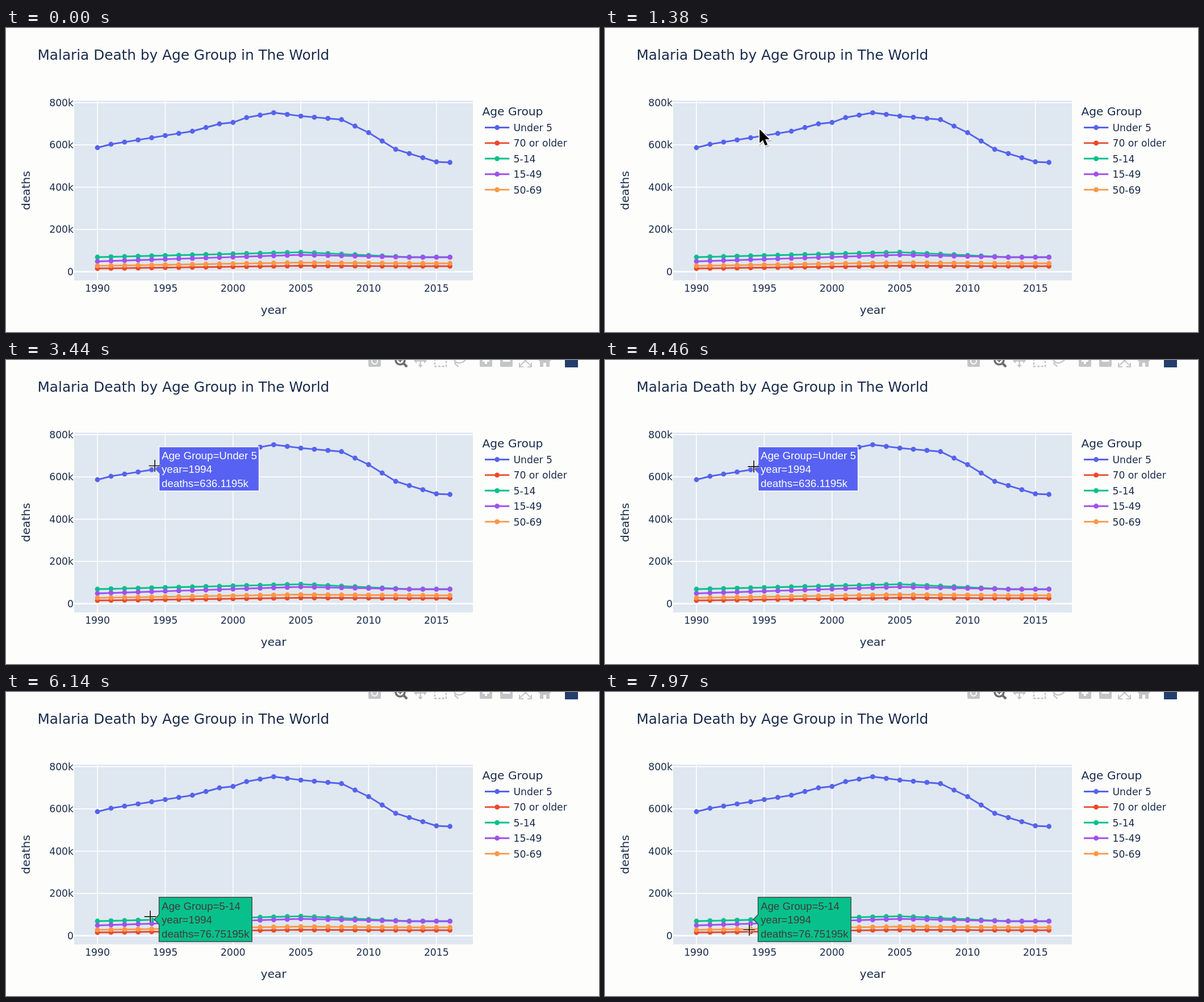
Animation of 1044 by 536 pixels, one loop 7990 ms. Source, as an HTML page:

```html
<!DOCTYPE html>
<html lang="en">
<head>
<meta charset="utf-8">
<title>Deaths by age group</title>
<style>
  html, body { margin: 0; width: 100%; height: 100%; overflow: hidden; background: #fdfdfb; }
  svg { display: block; width: 100%; height: 100%; }
  text { font-family: "DejaVu Sans", sans-serif; font-size: 17.2px; fill: #1a2c4d; }
  .label { font-size: 20.2px; }
  .title { font-size: 24.75px; }
  .tip text { font-family: "Liberation Sans", Arial, sans-serif; font-size: 18.7px; }
</style>
</head>
<body>
<svg id="stage" viewBox="0 0 1044 536"></svg>
<script>
const LOOP = 7990;
const stage = document.getElementById('stage');

function add(tag, attrs, parent = stage, content) {
  const el = document.createElementNS('http://www.w3.org/2000/svg', tag);
  for (const key in attrs) el.setAttribute(key, attrs[key]);
  if (content !== undefined) el.textContent = content;
  parent.appendChild(el);
  return el;
}
const text = (x, y, content, attrs = {}, parent = stage) => add('text', { x, y, ...attrs }, parent, content);
const path = (d, attrs, parent) => add('path', { d, fill: 'none', ...attrs }, parent);

const linear = p => p;
const easeInOut = p => (1 - Math.cos(Math.PI * p)) / 2;

// Value between key points [position, value, ...]; held beyond both ends.
function between(keys, at, column = 1, ease = linear) {
  const next = keys.findIndex(key => key[0] > at);
  if (next === 0) return keys[0][column];
  if (next < 0) return keys[keys.length - 1][column];
  const a = keys[next - 1], b = keys[next];
  return a[column] + (b[column] - a[column]) * ease((at - a[0]) / (b[0] - a[0]));
}

const yearX = year => 161 + (year - 1990) * 23.87;
const deathsY = thousands => 429.6 - thousands * 0.3725;

// A steady rise to 2005, then a fall that levels off in 2013.
const hump = (start, peak, end) => year => between([[1990, start], [2005, peak], [2013, end]], year);
const underFive = year => between([[1990, 211], [1991, 205], [1997, 182], [1999, 169], [2000, 166.5], [2001, 158],
  [2003, 149.3], [2005, 155.3], [2008, 161.5], [2010, 184.5], [2012, 214], [2015, 236], [2016, 237]], year);

const series = [
  ['Under 5', '#5663ec', underFive],
  ['70 or older', '#ea492c', hump(424, 419.3, 420)],
  ['5-14', '#08c08b', hump(404, 395.4, 404)],
  ['15-49', '#a052f0', hump(411.5, 400, 404.2)],
  ['50-69', '#fb9746', hump(419.4, 413.6, 415)]
];

function drawChart() {
  add('rect', { width: 1044, height: 536, fill: '#fdfdfb' });
  add('rect', { x: 120, y: 128, width: 702, height: 317, fill: '#dfe7f0' });
  add('rect', { x: 120, y: 128, width: 702, height: 2.5, fill: '#dfe4f9' });
  for (let year = 1990; year <= 2015; year += 5) {
    path(`M${yearX(year)} 128V445`, { stroke: '#fff', 'stroke-width': 1.6 });
    text(yearX(year), 465, year, { 'text-anchor': 'middle' });
  }
  for (let k = 0; k <= 800; k += 200) {
    path(`M120 ${deathsY(k)}H822`, { stroke: '#fff', 'stroke-width': k ? 1.6 : 2.9 });
    text(119, deathsY(k) + 6.3, k ? k + 'k' : '0', { 'text-anchor': 'end' });
  }
  text(55.5, 56, 'Malaria Death by Age Group in The World', { class: 'title' });
  text(471, 503.5, 'year', { class: 'label', 'text-anchor': 'middle' });
  text(0, 0, 'deaths', { class: 'label', 'text-anchor': 'middle', transform: 'translate(41.5 286.5) rotate(-90)' });
  text(838.5, 154, 'Age Group', { class: 'label' });

  series.forEach(([name, color, yAt], i) => {
    const line = { stroke: color, 'stroke-width': 2.9 };
    const dot = ([cx, cy]) => add('circle', { cx, cy, r: 4.4, fill: color });
    const points = Array.from({ length: 27 }, (_, n) => [yearX(1990 + n), yAt(1990 + n)]);
    path('M' + points.join('L'), line);
    points.forEach(dot);
    const y = 175.5 + i * 27.4;
    path(`M843 ${y}h43.2`, line);
    dot([864.6, y]);
    text(893.5, y + 6.5, name);
  });
}

function drawToolbar() {
  const bar = add('g', {});
  const gray = '#c4c5c8', dark = '#6d6e73', paper = '#fdfdfb';
  const solid = d => path(d, { fill: gray, 'fill-rule': 'evenodd' }, bar);
  const line = (d, attrs) => path(d, { stroke: gray, 'stroke-width': 2.4, ...attrs }, bar);
  const ring = (cx, cy, r, stroke, width) => add('circle', { cx, cy, r, fill: 'none', stroke, 'stroke-width': width }, bar);
  const tile = (x, fill = gray) => add('rect', { x, y: -10, width: 22, height: 22, rx: 2, fill }, bar);

  tile(638);
  ring(649, 2, 5, paper, 2);
  ring(694, 0, 8, dark, 3.6);
  line('M699 5l7 7', { stroke: dark, 'stroke-width': 4.4 });
  line('M690 0h8M694-4v8', { stroke: dark });
  line('M720 1.5h19M729.5-8V11');
  solid('M718 1.5l5-4.5v9zM741 1.5l-5-4.5v9zM729.5 13.5l-4.5-5h9z');
  line('M755-9V11.3H775V-9', { 'stroke-dasharray': '4 2.6' });
  line('M789-3C789 6 798 6 803 4S811-2 809-6M793 3q-5 3-1 5t3 4');
  tile(834);
  line('M839 1h12M845-5v12', { stroke: paper, 'stroke-width': 4 });
  tile(870);
  line('M874.5 1h13', { stroke: paper, 'stroke-width': 4 });
  line('M905-8L924 10M924-8L905 10M904 5v7h7M918 12h7V5', { 'stroke-width': 2 });
  solid('M937 2L948.5-9 960 2h-3v10h-6V5h-5v7h-6V2z');
  add('rect', { x: 984, y: -10, width: 23, height: 23, fill: '#243f6b' }, bar);
  return bar;
}

function drawTip(y, width, fill, stroke, color, lines) {
  const tip = add('g', { class: 'tip' });
  path(`M261 ${y}l8.5-8.5v-30.5h${width}v78h${-width}v-30.5z`, { fill, stroke, 'stroke-width': 1.4 }, tip);
  lines.forEach((content, i) => text(274, y - 17.3 + i * 24.4, content, { style: `fill:${color}` }, tip));
  return tip;
}

function drawArrow() {
  const arrow = add('g', {});
  const shape = 'M0 0V24.5L5.6 19.2 9.8 28.6 14 26.8 9.9 17.6H17.5Z';
  path(shape, { fill: '#000', stroke: '#000', 'stroke-width': 3, opacity: 0.18, transform: 'translate(1 2)' }, arrow);
  path(shape, { fill: '#000', stroke: '#fff', 'stroke-width': 3.2, 'paint-order': 'stroke' }, arrow);
  return arrow;
}

function drawCross() {
  const cross = add('g', {});
  const shape = 'M-10.5 0H10.5M0-10.5V10.5';
  path(shape, { stroke: '#fff', 'stroke-width': 3.6, opacity: 0.75 }, cross);
  path(shape, { stroke: '#111', 'stroke-width': 1.7 }, cross);
  return cross;
}

drawChart();
const toolbar = drawToolbar();
const blueTip = drawTip(192, 176, '#5762f2', '#fff', '#fff',
  ['Age Group=Under 5', 'year=1994', 'deaths=636.1195k']);
const greenTip = drawTip(401, 163.5, '#08c08b', '#3c4442', '#433a38',
  ['Age Group=5-14', 'year=1994', 'deaths=76.75195k']);
const arrow = drawArrow();
const cross = drawCross();

// time, x, y
const pointerKeys = [
  [20, 335, 548], [1100, 273, 178], [2690, 262, 186], [4800, 262, 188],
  [5480, 253, 321], [6250, 254, 400], [7800, 254, 400], [7960, 254, 419]
];
const HOVER_START = 2820;

// Each 140 ms holds three evenly spaced poses for 100, 20 and 20 ms.
function steppedTime(t) {
  const start = 120 + 140 * Math.floor((t - 120) / 140);
  const rest = t - start;
  return start + (rest < 100 ? 0 : rest < 120 ? 1 : 2) * 140 / 3;
}

const show = (el, on) => el.setAttribute('visibility', on ? 'visible' : 'hidden');

function render(now) {
  const t = steppedTime(now % LOOP);
  const hovering = t >= HOVER_START;
  const x = between(pointerKeys, t, 1, easeInOut);
  const y = between(pointerKeys, t, 2, easeInOut);
  for (const pointer of [arrow, cross]) pointer.setAttribute('transform', `translate(${x} ${y})`);
  show(arrow, !hovering);
  show(cross, hovering);
  toolbar.setAttribute('opacity', between([[HOVER_START, 0], [HOVER_START + 300, 1]], t));
  show(blueTip, hovering && y < 221);
  show(greenTip, y > 372 && hovering);
}

const began = performance.now();
function tick() {
  render(performance.now() - began);
  requestAnimationFrame(tick);
}
tick();
</script>
</body>
</html>
```
